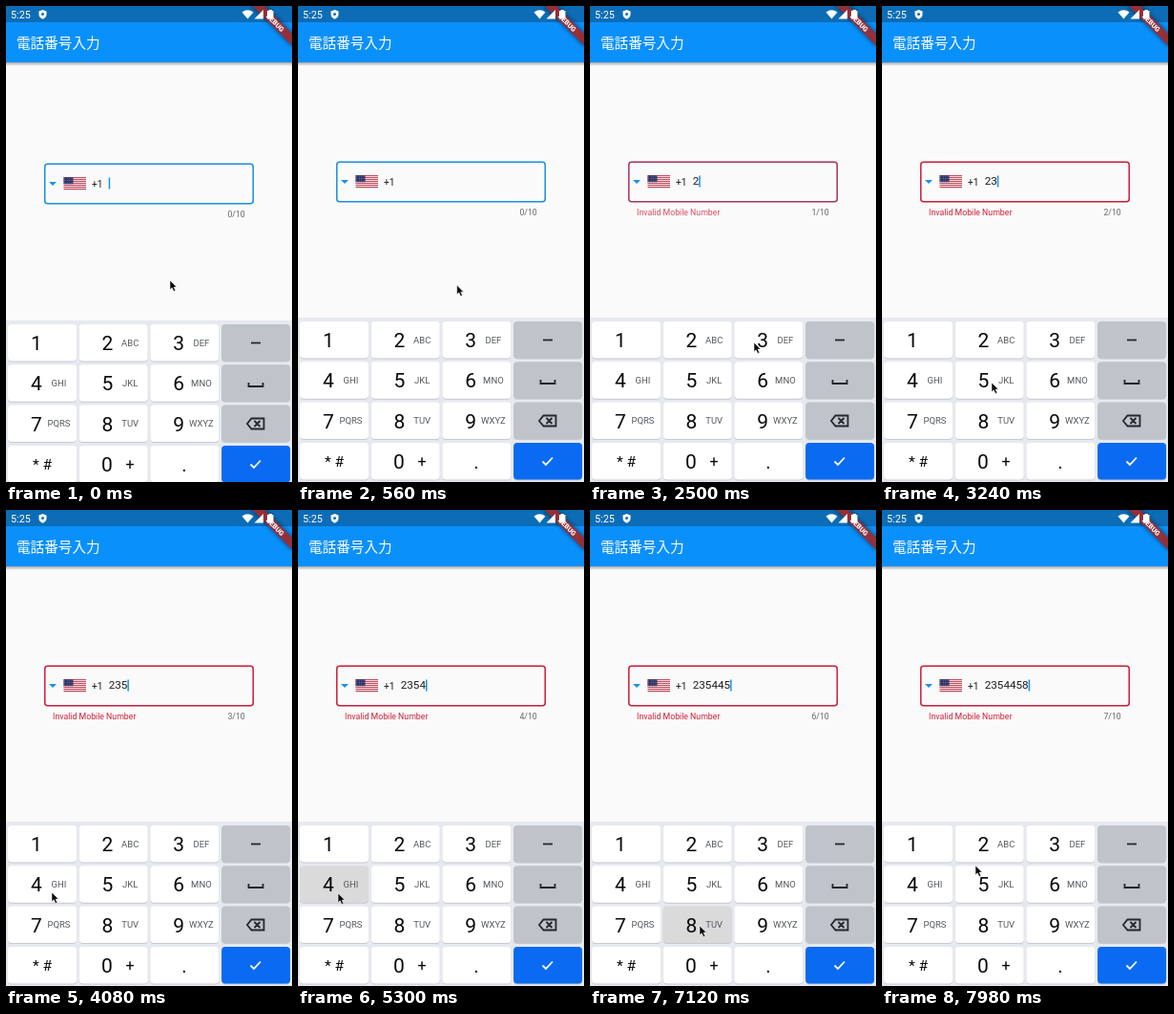
An HTML page that plays this animation: 300 px wide and 498 px high, repeating every 8000 ms.

```html
<!DOCTYPE html>
<html lang="ja">
<head>
<meta charset="utf-8">
<title>電話番号入力</title>
<style>
  html, body { margin: 0; height: 100%; overflow: hidden; background: #fafafa; }
  svg { display: block; width: 100vw; height: 100vh; font-family: Roboto, sans-serif; }
  text { white-space: pre; }
  .digit { font-size: 21px; fill: #080808; text-anchor: middle; }
  .label { font-size: 9.5px; fill: #54585c; text-anchor: middle; }
  .small { font-size: 8.76px; }
  .icon { fill: none; stroke: #24272b; stroke-width: 1.8; }
  .ribbon { fill: #94303a; filter: drop-shadow(0 0 2.5px rgba(0, 0, 0, .6)); }
</style>
</head>
<body>
<svg viewBox="0 0 300 498">
  <defs>
    <linearGradient id="shade" x2="0" y2="1">
      <stop stop-opacity=".32"/>
      <stop offset="1" stop-opacity="0"/>
    </linearGradient>
  </defs>
  <rect width="300" height="498" fill="#fafafa"/>

  <g id="bar">
    <rect y="59" width="300" height="4" fill="url(#shade)"/>
    <rect width="300" height="59" fill="#0a90fb"/>
    <rect width="300" height="17" fill="#0c6cb6"/>
    <text x="11" y="44" fill="#fff" font-size="14.6" font-family="'Noto Sans CJK JP','Noto Sans CJK',sans-serif">電話番号入力</text>
    <g transform="translate(300 0) rotate(45)">
      <rect class="ribbon" x="-30" y="20.4" width="60" height="8.8"/>
      <text y="27.4" font-size="7.2" font-weight="900" fill="#fff" text-anchor="middle">DEBUG</text>
    </g>
    <g fill="#fff">
      <text x="5" y="13" font-size="10.8">5:25</text>
      <path d="M38.5 4l4 1.5v3.2q0 3.4-4 5-4-1.6-4-5V5.5z"/>
      <path d="M247.5 6.500q6-4.500 12 0l-6 7z"/>
      <path d="M270 4v9.500h-9.500z"/>
      <path d="M275.500 4h3.500v1h1.500v8.500h-6.500v-8.500h1.500z"/>
    </g>
    <circle cx="38.5" cy="8.5" r="1.5" fill="#0c6cb6"/>
  </g>

  <g id="field">
    <rect id="border" x="40.750" y="163.250" width="218.5" height="41.500" rx="3" fill="none" stroke-width="1.5"/>
    <path d="M45 182h8l-4 4z" fill="#1594ea"/>
    <g id="flag" transform="translate(60.500 177.200)"></g>
    <text x="90" y="187.500" font-size="10.2" fill="#1c1c1c">+1</text>
    <text id="number" x="107.700" y="187.300" font-size="11.7" fill="#1c1c1c"></text>
    <rect id="caret" y="177.500" width="1.5" height="12" fill="#1594ea"/>
    <text id="error" class="small" x="49" y="219" fill="#ce2038">Invalid Mobile Number</text>
    <text id="count" class="small" x="250.800" y="219" fill="#666" text-anchor="end"></text>
  </g>

  <g id="keyboard"><rect y="326" width="300" height="176" fill="#e7e9f0"/></g>

  <path id="pointer" d="M0 0v9.800l2.200-2 1.700 3.700 1.900-.8-1.700-3.600h3z" fill="#080808" stroke="#fff" stroke-opacity=".8" stroke-width=".7"/>
</svg>

<script>
const LOOP = 8000;
const BLUE = [24, 142, 222], RED = [204, 28, 58];
const KEY_COLOR = '#fff', PRESSED_COLOR = '#dadada';
const $ = id => document.getElementById(id);

// time, x, y of the pointer tip
const path = [
  [0, 172, 287], [400, 172, 287], [1300, 109, 347], [2100, 109, 347],
  [2450, 172, 352], [2750, 172, 352], [3150, 115, 394], [3450, 115, 394],
  [4080, 48, 400], [4350, 42, 401], [5500, 42, 401], [6180, 138, 396],
  [6350, 130, 394], [6600, 130, 394], [7000, 115, 435], [7300, 115, 435],
  [7900, 98, 372], [8000, 98, 372]
];
// key, press time, time at which the digit shows
const taps = [
  ['2', 1960, 2370], ['3', 2580, 2850], ['5', 3270, 3640], ['4', 4430, 4850],
  ['4', 5240, 5700], ['5', 6420, 6750], ['8', 7100, 7510]
];
const PRESS_TIME = 150;

function add(parent, tag, attrs, content = '') {
  const el = document.createElementNS('http://www.w3.org/2000/svg', tag);
  for (const name in attrs) el.setAttribute(name, attrs[name]);
  el.textContent = content;
  return parent.appendChild(el);
}

function buildFlag() {
  for (let i = 0; i < 13; i++)
    add($('flag'), 'rect', { y: i, width: 23.5, height: 1, fill: i % 2 ? '#ecdfe2' : '#b8263e' });
  add($('flag'), 'rect', { width: 10, height: 7, fill: '#33376a' });
  for (let i = 0; i < 12; i++)
    add($('flag'), 'circle', { cx: 1.3 + i % 4 * 2.4, cy: 1.3 + (i >> 2) * 2.2, r: .35, fill: '#d4d4e0' });
}

const keys = {};
function buildKeyboard() {
  const board = $('keyboard');
  const labels = ['', 'ABC', 'DEF', 'GHI', 'JKL', 'MNO', 'PQRS', 'TUV', 'WXYZ'];
  const icons = ['M257 349.500h10', 'M254.500 391v4h15v-4',
    'M257.500 428.500h13v11h-13l-4.500-5.500zM260.500 431l6 6m0-6l-6 6', 'M256.500 476.500l3.500 3.500 7-7.500'];

  for (let row = 0; row < 4; row++) {
    const y = 330 + row * 42.3;
    for (let col = 0; col < 4; col++) {
      const x = 2 + col * 74.7;
      const box = { x, width: 72, height: 38.5, rx: 4 };
      const fill = col < 3 ? KEY_COLOR : row < 3 ? '#bfc4ca' : '#0a6af2';
      add(board, 'rect', { ...box, y: y + 1, fill: '#c6c9d0' });
      const face = add(board, 'rect', { ...box, y, fill });
      if (col === 3) {
        add(board, 'path', { d: icons[row], class: 'icon', style: row === 3 ? 'stroke:#fff' : '' });
      } else if (row < 3) {
        const index = row * 3 + col;
        keys[index + 1] = face;
        add(board, 'text', { x: x + 29.8, y: y + 27, class: 'digit' }, index + 1);
        add(board, 'text', { x: x + 53.5, y: y + 22.7, class: 'label' }, labels[index]);
      }
    }
  }
  add(board, 'text', { x: 38, y: 482, class: 'digit', style: 'font-size:15.5px' }, '* #');
  add(board, 'text', { x: 106, y: 484, class: 'digit' }, '0');
  add(board, 'text', { x: 130, y: 482, class: 'digit', style: 'font-size:16px' }, '+');
  add(board, 'text', { x: 187, y: 484, class: 'digit' }, '.');
}

const clamp = v => Math.max(0, Math.min(1, v));
const smooth = v => v * v * (3 - 2 * v);
const mix = (a, b, k) => a + (b - a) * k;

function pointerAt(t) {
  const i = path.findIndex(p => p[0] > t);
  const [t0, x0, y0] = path[i - 1], [t1, x1, y1] = path[i];
  const k = smooth((t - t0) / (t1 - t0));
  return [mix(x0, x1, k), mix(y0, y1, k)];
}

function render(t) {
  const settle = (1 - clamp((t - 15) / 90)) ** 2;
  $('field').setAttribute('transform', `translate(0 ${2 * settle})`);
  $('keyboard').setAttribute('transform', `translate(0 ${3 * settle})`);
  $('pointer').setAttribute('transform', `translate(${pointerAt(t)})`);

  const typed = taps.filter(tap => t >= tap[2]);
  $('number').textContent = typed.map(tap => tap[0]).join('');
  $('count').textContent = typed.length + '/10';

  const blinkStart = typed.length ? typed.at(-1)[2] : -400;
  $('caret').setAttribute('x', 107.7 + typed.length * 6.57);
  $('caret').setAttribute('visibility', (t - blinkStart) % 1000 < 500 ? 'visible' : 'hidden');

  const invalid = clamp((t - taps[0][2]) / 167);
  $('border').setAttribute('stroke', `rgb(${BLUE.map((c, i) => Math.round(mix(c, RED[i], invalid)))})`);
  $('error').setAttribute('opacity', invalid);
  $('error').setAttribute('transform', `translate(0 ${-2 * (1 - invalid)})`);

  for (const key in keys) {
    const down = taps.some(([k, at]) => k === key && t >= at && t < at + PRESS_TIME);
    keys[key].setAttribute('fill', down ? PRESSED_COLOR : KEY_COLOR);
  }
}

buildFlag();
buildKeyboard();
render(0);
const start = performance.now();
(function tick() {
  render((performance.now() - start) % LOOP);
  requestAnimationFrame(tick);
})();
</script>
</body>
</html>
```
